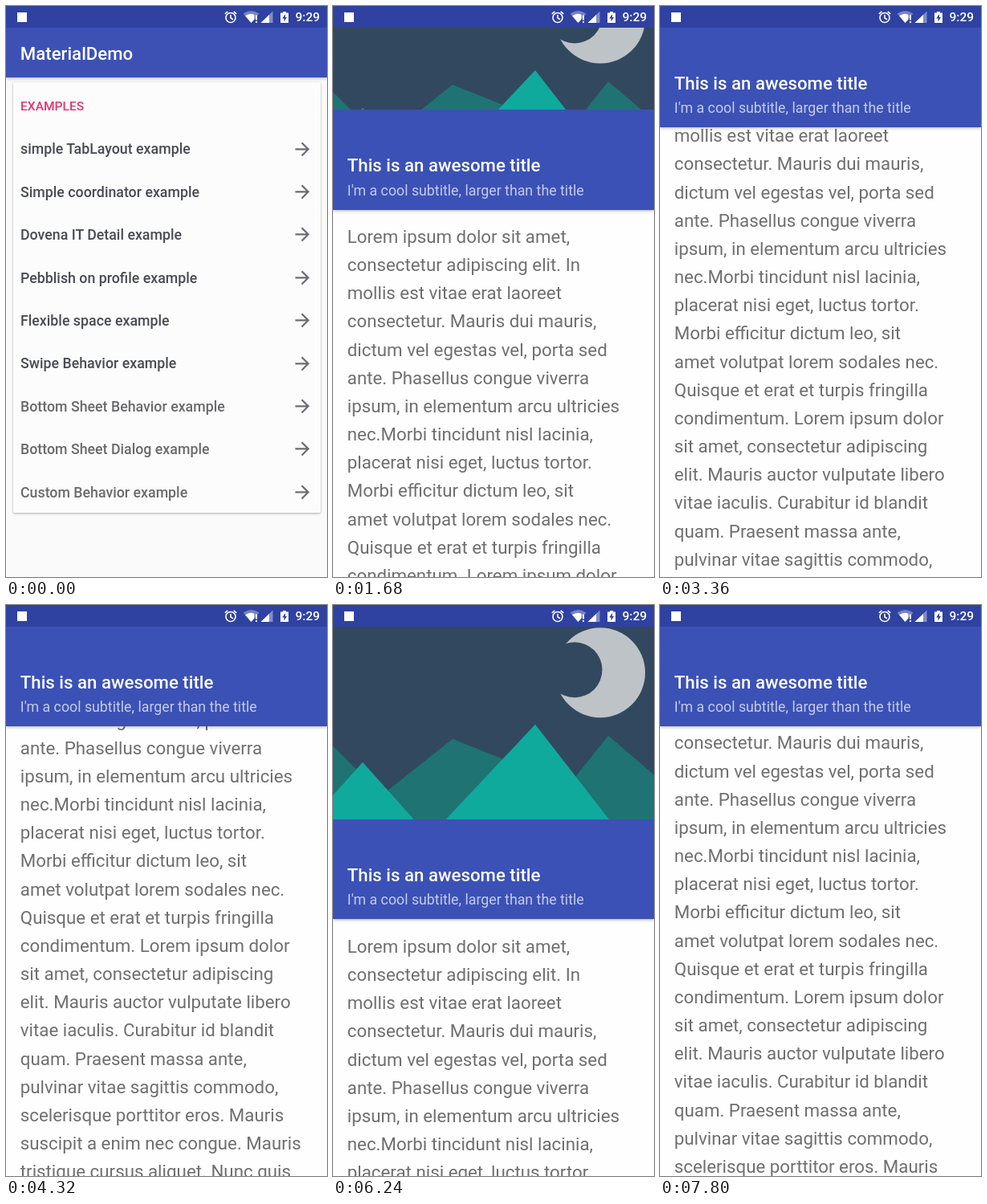
Write an HTML page that moves like this. It is 400 px wide and 711 px high and loops after 7920 ms.

```html
<!DOCTYPE html>
<html lang="en">
<head>
<meta charset="utf-8">
<title>Flexible space demo</title>
<style>
  html, body { margin: 0; width: 100%; height: 100%; overflow: hidden; }
  body { font-family: Roboto, "Noto Sans", sans-serif; background: #fafafb; }
  #stage { position: relative; width: 400px; height: 711px; overflow: hidden; white-space: nowrap; }
  #stage div { position: absolute; }
  .screen { left: 0; top: 0; width: 400px; height: 711px; overflow: hidden; }
  .medium { font-weight: 500; }
  .line { left: 17.8px; height: 36px; line-height: 36px; }
  .big { font-size: 22.22px; color: #fff; }
  .sub { font-size: 17.78px; color: #c4cbe9; }

  #menu { background: #fafafb; }
  #bar { left: 0; top: 0; width: 400px; height: 89px; background: #3d51b5; box-shadow: 0 1px 4px rgba(0,0,0,.28); }
  #card { left: 9px; top: 95px; width: 383px; height: 536px; border-radius: 2px;
          background: #fcfcfd; box-shadow: 0 1px 3px rgba(0,0,0,.32); overflow: hidden; }
  #label { left: 9px; top: 12px; color: #e8336f; font-size: 15.56px; }
  .item { left: 0; width: 383px; height: 53.4px; line-height: 54.4px; font-size: 17.78px; color: #484b52; }
  .item:nth-child(n+9) { color: #6a6a6c; }
  .item span { position: absolute; left: 9px; }
  .item svg { position: absolute; left: 346.7px; top: 13.3px; fill: #6c6d72; }
  #ripple { left: 0; width: 383px; height: 53.4px; overflow: hidden; }
  #ripple i { position: absolute; left: 190px; top: 26.7px; width: 0; height: 0; border-radius: 50%; background: #d8d8da; }

  #detail { background: #fefefe; }
  #text { left: 17.8px; top: 0; font-size: 22.3px; line-height: 35.15px; color: #6f6f6f; white-space: pre; }
  #header { left: 0; top: 0; width: 400px; background: #3b51b6; box-shadow: 0 1px 4px rgba(0,0,0,.3); }
  #picture { left: 0; top: 0; width: 400px; overflow: hidden; background: #32485f; }
  #picture svg { position: absolute; left: 0; top: 0; overflow: visible; }
  #scrim { left: 0; top: 0; width: 400px; height: 100%; background: #3b51b6; }
  #status { left: 0; top: 0; width: 400px; height: 27px; background: #2f41a1; }
  #clock { left: 360.5px; top: 0; line-height: 28px; font-size: 15.56px; color: #fff; }
</style>
</head>
<body>
<div id="stage">
  <div id="menu" class="screen">
    <div id="bar"><div class="line big medium" style="top:41px">MaterialDemo</div></div>
    <div id="card">
      <div id="ripple"><i></i></div>
      <div id="label" class="line medium">EXAMPLES</div>
    </div>
  </div>

  <div id="detail" class="screen">
    <div id="text">Lorem ipsum dolor sit amet,
consectetur adipiscing elit. In
mollis est vitae erat laoreet
consectetur. Mauris dui mauris,
dictum vel egestas vel, porta sed
ante. Phasellus congue viverra
ipsum, in elementum arcu ultricies
nec.Morbi tincidunt nisl lacinia,
placerat nisi eget, luctus tortor.
Morbi efficitur dictum leo, sit
amet volutpat lorem sodales nec.
Quisque et erat et turpis fringilla
condimentum. Lorem ipsum dolor
sit amet, consectetur adipiscing
elit. Mauris auctor vulputate libero
vitae iaculis. Curabitur id blandit
quam. Praesent massa ante,
pulvinar vitae sagittis commodo,
scelerisque porttitor eros. Mauris
suscipit a enim nec congue. Mauris
tristique cursus aliquet. Nunc quis
mollis ante, vitae dictum lorem.
Praesent sit amet erat leo.</div>
    <div id="header">
      <div id="picture">
        <svg width="400" height="300">
          <g id="scene">
            <circle cx="333" cy="15.5" r="56" fill="#bdc3c7"/>
            <circle cx="301" cy="12" r="34.5" fill="#32485f"/>
            <g fill="#1f7473">
              <path d="M149 98L-66 269H577Z"/>
              <path d="M-20 87L-200 269H162Z"/>
              <path d="M343 94L203 269H548Z"/>
            </g>
            <g fill="#10aa9c">
              <path d="M252 80L74 269H399Z"/>
              <path d="M37 127L-90 269H164Z"/>
            </g>
          </g>
        </svg>
        <div id="scrim"></div>
      </div>
      <div class="line big medium" style="bottom:37.5px">This is an awesome title</div>
      <div class="line sub" style="bottom:6px">I'm a cool subtitle, larger than the title</div>
    </div>
  </div>

  <div id="status">
    <svg width="400" height="27" fill="#fff">
      <rect x="14" y="8" width="12" height="12"/>
      <g fill="none" stroke="#fff" stroke-width="1.6">
        <circle cx="280" cy="14.5" r="6"/>
        <path d="M280 11V15L283 16.8M272.8 9.8L276.3 6.8M287.2 9.8L283.7 6.8"/>
      </g>
      <path d="M295.5 9.5Q305.5 2.5 315.5 9.5L305.5 21Z" opacity=".35"/>
      <path d="M298 12.3Q304.5 8 309.5 11V16.5L305.5 21Z"/>
      <path d="M311 11.5h2v6h-2zM311 19h2v2h-2z"/>
      <path d="M317.5 21L332.5 6.5V21Z" opacity=".4"/>
      <path d="M317.5 21L328 11V21Z"/>
      <path d="M342 8.5H345V7H349V8.5H352V21H342Z"/>
      <path d="M348 10L344.3 15.5H346.5V19.5L350 14H348Z" fill="#2f41a1"/>
    </svg>
    <div id="clock" class="medium">9:29</div>
  </div>
</div>

<script>
  const LOOP = 7920, STEP = 120, ROW = 53.4;
  const BAND = 124.5, COLLAPSED = 151, TEXT_GAP = 16.9;
  const $ = id => document.getElementById(id);
  const clamp = v => Math.min(1, Math.max(0, v));

  const items = ['simple TabLayout', 'Simple coordinator', 'Dovena IT Detail',
    'Pebblish on profile', 'Flexible space', 'Swipe Behavior',
    'Bottom Sheet Behavior', 'Bottom Sheet Dialog', 'Custom Behavior'];
  const rowTop = i => 56.3 + i * ROW;
  const arrow = '<svg width="26.67" height="26.67" viewBox="0 0 24 24">' +
    '<path d="M12 4l-1.41 1.41L16.17 11H4v2h12.17l-5.58 5.59L12 20l8-8z"/></svg>';

  items.forEach((name, i) => {
    const row = document.createElement('div');
    row.className = 'item medium';
    row.style.top = rowTop(i) + 'px';
    row.innerHTML = `<span>${name} example</span>${arrow}`;
    $('card').append(row);
  });
  $('ripple').style.top = rowTop(4) + 'px';

  // Time and unclamped header bottom while the page is dragged.
  const drag = [[0, 391], [1080, 391], [1320, 345], [1680, 253.5], [2040, 170],
    [2520, 110], [3000, 72], [3360, 57.3], [3600, 40], [4320, -32], [4560, -38],
    [4800, 0], [5040, 90], [5400, 246.7], [5640, 370], [5760, 391], [6360, 391],
    [6720, 325], [7080, 242.5], [7440, 130], [7800, 32], [LOOP, 32]];

  function bottomAt(t) {
    const i = drag.findIndex(([end]) => end > t);
    const [t0, a] = drag[i - 1], [t1, b] = drag[i];
    return a + (b - a) * (t - t0) / (t1 - t0);
  }

  const fade = (t, start) => clamp((t - start) / 600);
  const scrimAt = t => fade(t, 1800) - fade(t, 5380) + fade(t, 7140);

  function draw(t) {
    const bottom = bottomAt(t);
    const height = Math.max(COLLAPSED, bottom);
    const edge = height - BAND;
    $('text').style.transform = `translateY(${bottom + TEXT_GAP}px)`;
    $('header').style.height = height + 'px';
    $('picture').style.height = edge + 'px';
    $('scene').setAttribute('transform', `translate(0 ${(edge - 129) / 2})`);
    $('scrim').style.opacity = scrimAt(t);

    const enter = clamp((t - 480) / 360);
    const ease = 1 - (1 - enter) ** 3;
    $('detail').style.opacity = ease;
    $('detail').style.transform = `translateY(${57 * (1 - ease)}px)`;

    const press = clamp((t - 120) / 360);
    const spot = $('ripple').firstChild.style;
    spot.boxShadow = `0 0 0 ${200 * press}px #d8d8da`;
    spot.opacity = press ? .7 : 0;
  }

  const start = performance.now();
  function tick() {
    const t = Math.max(0, performance.now() - start) % LOOP;
    draw(Math.floor(t / STEP) * STEP);
    requestAnimationFrame(tick);
  }
  tick();
</script>
</body>
</html>
```
